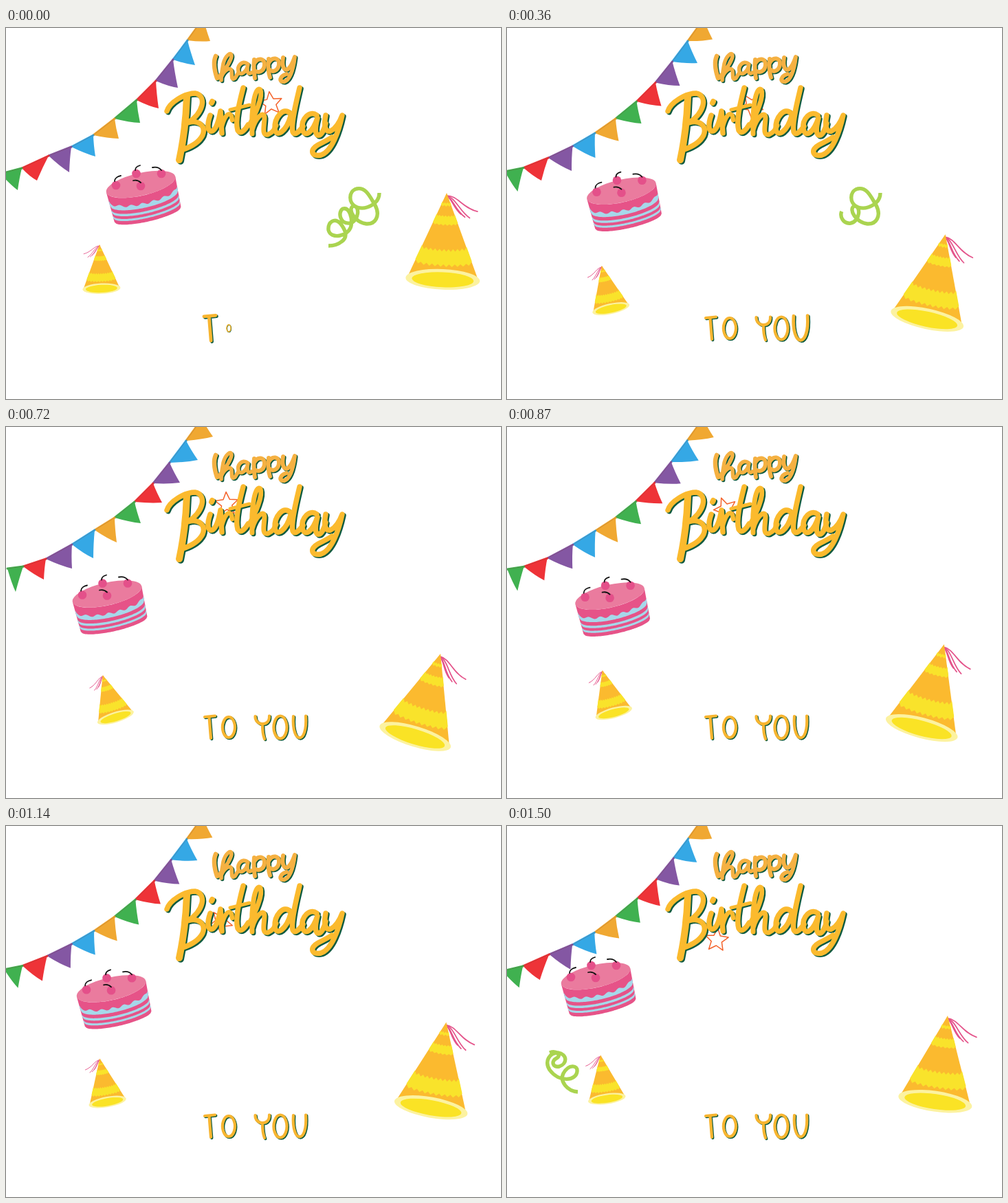
Recreate the animation shown at these times as an HTML page. Size 720 by 540 pixels, loop 1.53 s.

```html
<!DOCTYPE html>
<html lang="en">
<head>
<meta charset="utf-8">
<title>Happy Birthday To You</title>
<style>
html, body { margin: 0; width: 100%; height: 100%; overflow: hidden; background: #fff; }
svg { display: block; width: 720px; height: 540px; }
.line { fill: none; stroke-linecap: round; stroke-linejoin: round; }
</style>
</head>
<body>
<svg id="stage" viewBox="0 0 720 540" role="img" aria-label="Happy Birthday To You"></svg>
<script>
const LOOP = 1530, STEP = 30;
const GOLD = '#fbba2e', SHADE = '#0d5b40';
const stage = document.getElementById('stage');
const $ = id => document.getElementById(id);
const mix = (a, b, k) => a + (b - a) * k;
const clamp = x => Math.max(0, Math.min(1, x));
const poly = pts => 'M' + pts.map(p => p.map(v => v.toFixed(1)).join(',')).join('L') + 'Z';

// Smooth curve through values at shared key times
const KEYS = [0, 240, 480, 720, 990, 1320, 1500];
function track(v, t, at = KEYS) {
  const n = at.length - 1;
  if (t >= at[n]) return v[n];
  let i = 0;
  while (t >= at[i + 1]) i++;
  const slope = j => {
    const a = Math.max(0, j - 1), b = Math.min(n, j + 1);
    return (v[b] - v[a]) / (at[b] - at[a]);
  };
  const h = at[i + 1] - at[i], u = (t - at[i]) / h, w = 1 - u;
  return w * w * ((1 + 2 * u) * v[i] + u * h * slope(i)) +
         u * u * ((3 - 2 * u) * v[i + 1] - w * h * slope(i + 1));
}
function linear(v, t, at) {
  let i = 0;
  while (i < at.length - 2 && t >= at[i + 1]) i++;
  return mix(v[i], v[i + 1], clamp((t - at[i]) / (at[i + 1] - at[i])));
}

// Bunting
const FLAG_COLORS = ['#f0a832', '#35a8e5', '#8457a3', '#ee3338', '#40b150'];
const ROPE_A = [287,-14, 264,18, 243,46, 218,77, 190,105, 158,132, 127,156, 95,173, 62,186, 23,204, -8,212];
const ROPE_B = [285,-12, 262,20, 238,52, 214,82, 187,109, 158,132, 129,150, 96,171, 58,192, 25,203, 2,206];
const TIPS_A = [297,19, 275,54, 250,87, 222,117, 195,138, 164,161, 130,187, 92,210, 45,222, 17,236];
const TIPS_B = [301,14, 279,48, 253,81, 227,110, 196,140, 161,168, 127,191, 96,206, 55,222, 14,240];
const TIPS_C = [300,18, 278,51, 252,86, 224,115, 192,145, 162,167, 131,186, 93,207, 52,227, 19,234];
const ROPE_C = ROPE_A.map((v, i) => mix(v, ROPE_B[i], .35));
const ROPES = [ROPE_A, ROPE_B, ROPE_C, ROPE_A], TIPS = [TIPS_A, TIPS_B, TIPS_C, TIPS_A];
const pose = (set, p) => {
  const i = Math.min(2, Math.floor(p));
  return set[i].map((v, j) => mix(v, set[i + 1][j], p - i));
};
const bunting = () => Array.from({ length: 10 }, (_, i) => {
  const c = FLAG_COLORS[i % 5];
  return `<path id="flag${i}" fill="${c}"/><path id="hem${i}" class="line" stroke="${c}" stroke-width="3"/>`;
}).join('') + '<path id="rope" class="line" stroke="#7a3b2a" stroke-opacity=".25" stroke-width="1"/>';

// Lettering: [stroke width, path]
const HAPPY = [
  [6.5, 'M305,41C301,50 304,64 307,73'],
  [5.5, 'M308,73C314,66 327,50 328,41C328,33 319,40 316,52C314,63 313,70 313,76M313,72C317,61 326,56 328,62C329,70 327,77 333,73L338,65'],
  [5.5, 'M351,52C343,46 336,56 338,63C341,71 350,64 352,53C350,62 351,69 357,65'],
  [6, 'M361,46C360,56 361,67 362,73M361,52C366,42 377,44 376,54C375,64 366,66 362,62'],
  [6, 'M382,45C381,55 382,66 384,72M382,51C387,41 398,43 397,53C396,62 388,65 384,61'],
  [6, 'M403,43C401,55 404,63 410,60C415,56 418,48 420,42C418,58 414,75 405,78C396,79 398,70 408,67']
];
const BIRTHDAY = [
  [10, 'M263,100C262,131 258,164 252,192'],
  [7.5, 'M234,121C238,108 260,95 275,95C293,98 287,125 264,138C281,133 291,143 286,156C280,168 266,174 257,177'],
  [7.5, 'M297,127C292,141 293,152 300,150C306,147 310,132 312,121C313,132 313,142 314,153'],
  [8, 'M300,107L299,109'],
  [6.5, 'M314,143C318,128 324,121 328,128L329,134'],
  [7.5, 'M345,87C339,110 333,135 337,149C341,156 348,148 352,141'],
  [5, 'M326,119L354,112'],
  [7, 'M354,141C363,125 374,100 370,90C363,83 356,115 358,154M358,148C363,130 375,120 376,130C376,142 371,157 381,155C388,152 390,148 393,142'],
  [7.5, 'M413,124C404,114 390,130 391,147C393,161 408,150 414,128M427,87C422,108 414,140 417,151C420,158 427,150 432,143'],
  [7.5, 'M452,127C442,119 429,132 431,147C434,161 446,152 453,131C449,146 449,158 456,156C461,153 463,146 465,139'],
  [7.5, 'M465,127C462,142 464,152 472,150C480,146 486,135 489,127C484,150 474,180 458,185C444,188 441,177 454,170C462,166 468,163 474,159']
];
const strokes = (list, color) => list.map(([w, d]) =>
  `<path class="line" d="${d}" stroke="${color}" stroke-width="${w}"/>`).join('');
const lettering = (list, color, dx, dy) =>
  `<g transform="translate(${dx} ${dy})">${strokes(list, SHADE)}</g>${strokes(list, color)}`;

const oval = (x, y, rx, ry) => `M${x},${y - ry}a${rx},${ry} 0 1 1 -.1,0Z`;
// Popping letters: centre x, start time, path
const POP = [
  [297, -110, 'M289,422L304,420.5M295.5,422L298,453'],
  [324, -30, oval(324, 437, 9, 15)],
  [373, 75, 'M362.5,421C362,435 384,437 383,420.5M373,433C373,442 374,449 376,454'],
  [399, 105, oval(399, 437, 9.5, 16.5)],
  [427, 240, 'M418,421C415,462 439,464 436,420.5']
];

// Cake, local origin at the middle of its top face
function cake() {
  const R = 51.5, RY = 16.5, xs = Array.from({ length: 53 }, (_, i) => -R + i * 2 * R / 52);
  const rim = (y, wave = 0) => xs.map(x => [x * (1 - y * .0008),
    y + (RY - y * .14) * Math.sqrt(Math.max(0, 1 - x * x / R / R)) + wave * Math.sin(x * .38)]);
  const band = (a, b, color, wave) =>
    `<path d="${poly([...rim(a, wave), ...rim(b).reverse()])}" fill="${color}"/>`;
  const blue = '#a6d8ea', pink = '#e65388';
  const cherries = [
    [160, 229, 'M158,223C158,219 162,216 167,215'],
    [189.5, 212, 'M188,207C188,203 191,201 195,200'],
    [226, 212, 'M226,207C223,203 218,202 213,203'],
    [196, 230, 'M196,225C193,222 189,221 185,222']
  ];
  return `<g transform="translate(196 227.5) rotate(-13)">
    ${band(0, 45, pink)}${band(14, 21, blue, 1.6)}${band(27, 31, blue)}${band(35.5, 39, blue)}
    <ellipse rx="${R}" ry="${RY}" fill="#ea7b9e"/></g>` +
    cherries.map(([x, y, d]) => `<circle cx="${x}" cy="${y}" r="6.3" fill="#e4508a"/>
      <path class="line" d="${d}" stroke="#111" stroke-width="1.8"/>`).join('');
}

// Party hat, local origin at its tip
function hat() {
  const edge = (y, n) => Array.from({ length: 2 * n + 1 }, (_, i) => {
    const s = i / n - 1, zig = (i % 2 ? 1 : -1) * (y > 50 ? 1.8 : 1);
    return [s * y * .412, y + y * .06 * Math.sqrt(1 - s * s) + zig];
  });
  const band = (a, b, n) => `<path d="${poly([...edge(a, n), ...edge(b, n).reverse()])}" fill="#f9e32b"/>`;
  const tassels = ['C16,3 24,21 46,25', 'C13,6 20,26 35,35', 'C10,8 13,24 28,34', 'C8,8 11,22 22,30'];
  return `${tassels.map(d => `<path class="line" d="M0,4${d}" stroke="#e4538a" stroke-width="1.7"/>`).join('')}
    <path d="M0,0L52.5,127H-52.5Z" fill="#fbba2f"/>
    ${band(14, 18, 3)}${band(32, 44, 6)}${band(79, 100, 10)}
    <g transform="translate(0 126)"><ellipse rx="54" ry="15" fill="#fcf2a0"/>
    <ellipse cy=".5" rx="45" ry="11" fill="#fae325"/></g>`;
}

const STAR = poly(Array.from({ length: 10 }, (_, i) => {
  const r = i % 2 ? 8 : 17.5, a = i * Math.PI / 5;
  return [r * Math.sin(a), -r * Math.cos(a)];
}));
const CURL_R = 'M543,240C543,256 524,265 511,261C497,256 498,237 510,234C524,231 530,247 537,258' +
  'C545,274 537,286 524,285C508,283 496,264 505,259C515,258 514,281 500,284C486,286 482,268 490,263' +
  'C500,260 504,278 502,288C498,304 472,308 469,294C468,282 478,276 486,284C494,294 498,304 488,311C482,316 476,317 469,317';
const CURL_L = 'M103,387C88,386 76,372 82,360C90,346 103,348 102,357C101,371 76,374 62,355' +
  'C54,342 62,330 74,330C88,332 88,346 76,350C66,352 64,342 72,338C80,334 72,326 62,330';
const curl = (id, d) =>
  `<path id="${id}" class="line" pathLength="1" d="${d}" stroke="#aad450" stroke-width="5.4" style="stroke-linecap:butt"/>`;

stage.innerHTML = bunting() +
  `<path id="star" class="line" d="${STAR}" stroke="#f4622a" stroke-width="1.5"/>` +
  lettering(HAPPY, '#f5b142', 1.6, 1.4) + lettering(BIRTHDAY, GOLD, 2, 1.7) +
  POP.map(([, , d], i) => `<g id="pop${i}">${lettering([[4.2, d]], '#f8b530', 1.3, 1.2)}</g>`).join('') +
  curl('curlR', CURL_R) + curl('curlL', CURL_L) +
  `<g id="cake">${cake()}</g><g id="hat">${hat()}</g>
  <use href="#hat" transform="translate(136 315) scale(-.51 .51) translate(-641 -240)"/>`;

function place(id, x, y, turn = 0) {
  $(id).setAttribute('transform', `translate(${x.toFixed(2)} ${y.toFixed(2)}) rotate(${turn.toFixed(2)})`);
}
function trim(id, part) {
  $(id).style.display = part > .002 ? '' : 'none';
  $(id).setAttribute('stroke-dasharray', `${part} 2`);
}

function drawFlags(t) {
  const p = linear([0, 1, 2, 2.6], t, [0, 720, 1320, 1500]);
  const r = pose(ROPES, p), tips = pose(TIPS, p);
  let rope = `M${r[0]},${r[1]}`;
  for (let i = 0; i < 10; i++) {
    const [ax, ay, bx, by] = r.slice(2 * i, 2 * i + 4), x = tips[2 * i], y = tips[2 * i + 1];
    const mx = (ax + bx) / 2, my = (ay + by) / 2;
    const bend = (px, py, k) => `${(px + x) / 2 + (x - mx) * k},${(py + y) / 2 + (y - my) * k}`;
    $('flag' + i).setAttribute('d',
      `M${ax},${ay}Q${bend(ax, ay, -.06)} ${x},${y}Q${bend(bx, by, .12)} ${bx},${by}Z`);
    $('hem' + i).setAttribute('d', `M${ax},${ay}L${bx},${by}`);
    rope += `L${bx},${by}`;
  }
  $('rope').setAttribute('d', rope);
}

function draw(t) {
  drawFlags(t);
  place('star', track([385, 366, 345, 321, 317, 307, 305], t), track([110, 113, 112, 112, 128, 154, 166], t),
    track([-7, -25, -45, -75, -104, -114, -139], t));
  place('cake', track([0, -17, -41, -49, -44, -46, -67], t), track([0, 10.5, 8.5, 15.5, 18, -3.5, -9], t));
  place('hat', track([641, 641, 634, 632, 639, 641, 641], t), track([240, 277, 320, 330, 302, 270, 276], t),
    track([2.6, 8.4, 15.3, 17, 12.8, 7.6, 8.3], t));
  POP.forEach(([x, start], i) => {
    const s = linear([0, 1.15, 1, 1], t - start, [0, 100, 200, 300]);
    $('pop' + i).style.display = s > 0 ? '' : 'none';
    $('pop' + i).setAttribute('transform', `translate(${x} 437) scale(${s || 1}) translate(${-x} -437)`);
  });
  trim('curlR', linear([1, .95, .28, 0], t, [0, 240, 480, 600]));
  trim('curlL', linear([0, .13, 1], t, [1270, 1320, 1500]));
}

const begin = performance.now();
function tick() {
  const t = (performance.now() - begin) % LOOP;
  draw(Math.floor(t / STEP) * STEP);
  requestAnimationFrame(tick);
}
tick();
</script>
</body>
</html>
```
